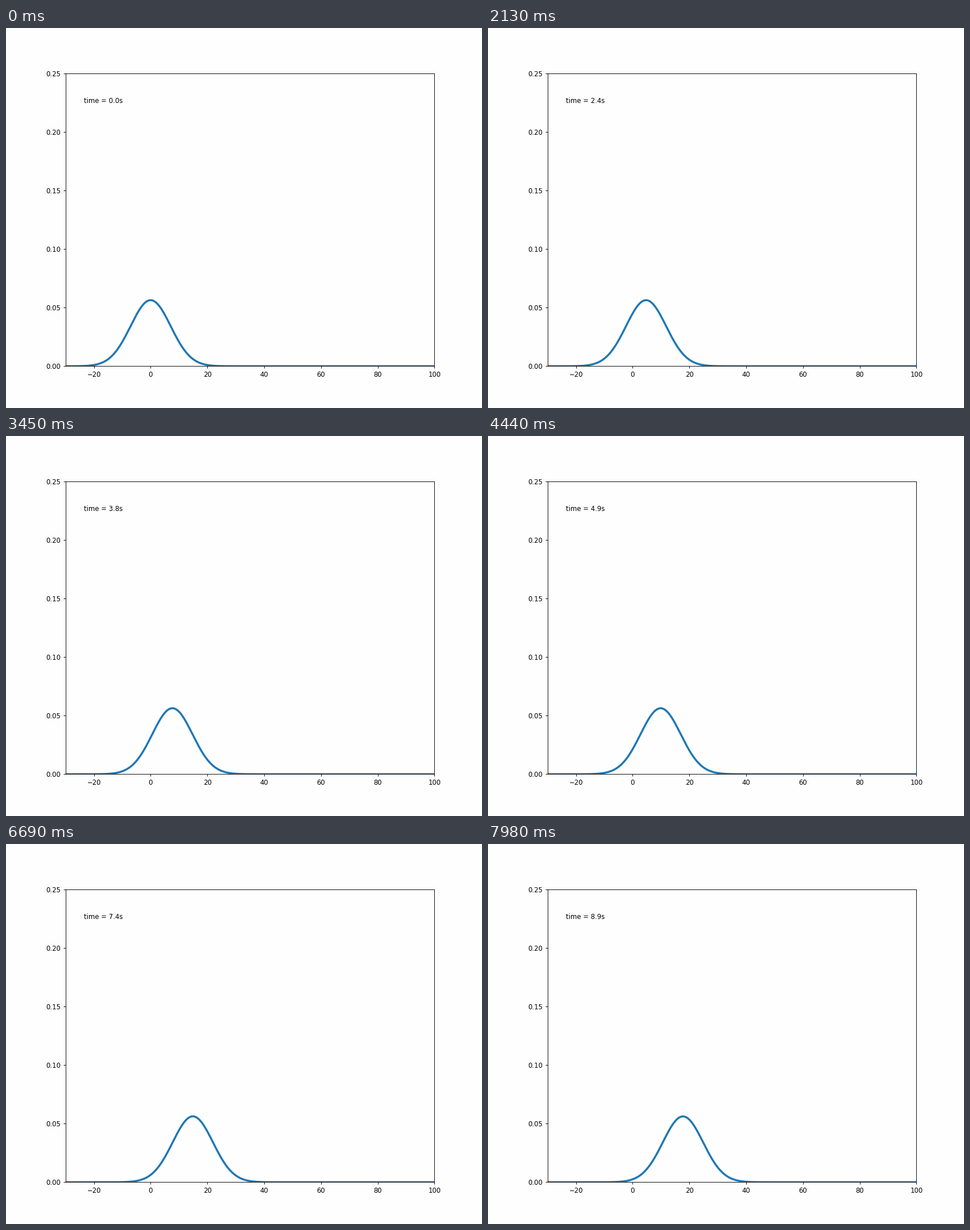
Animation, 837 px wide and 669 px high, one loop 8000 ms. Source, as a matplotlib script:

```python
import numpy as np
import matplotlib.pyplot as plt
from matplotlib.animation import FuncAnimation

WIDTH, HEIGHT, DPI = 837, 669, 83.7
LOOP_MS, FRAMES = 8000, 267
DT = 1 / 30          # simulated seconds per frame
SPEED, SIGMA = 2.0, 10.0
PAPER = "#fefefe"

plt.rcParams["font.family"] = "DejaVu Sans"

# the small margin keeps the pixel size from rounding down
fig = plt.figure(figsize=((WIDTH + 0.01) / DPI, (HEIGHT + 0.01) / DPI),
                 dpi=DPI, facecolor=PAPER)
ax = fig.add_subplot(xlim=(-30, 100), ylim=(0, 0.25), facecolor=PAPER)

x = np.linspace(-30, 100, 1301)
line, = ax.plot([], [], lw=3, color="#1f77b4")
label = ax.text(0.05, 0.9, "", transform=ax.transAxes)


def density(t):
    """Free Gaussian wave packet: drifts and spreads very slowly."""
    width = SIGMA * np.sqrt(1 + (t / SIGMA**2) ** 2)
    return np.exp(-((x - SPEED * t) / width) ** 2) / (width * np.sqrt(np.pi))


def draw(i):
    t = i * DT
    line.set_data(x, density(t))
    label.set_text(f"time = {t:.1f}s")
    return line, label


anim = FuncAnimation(fig, draw, frames=FRAMES, init_func=lambda: draw(0),
                     interval=LOOP_MS / FRAMES, repeat=True, repeat_delay=0)
plt.show()
```
